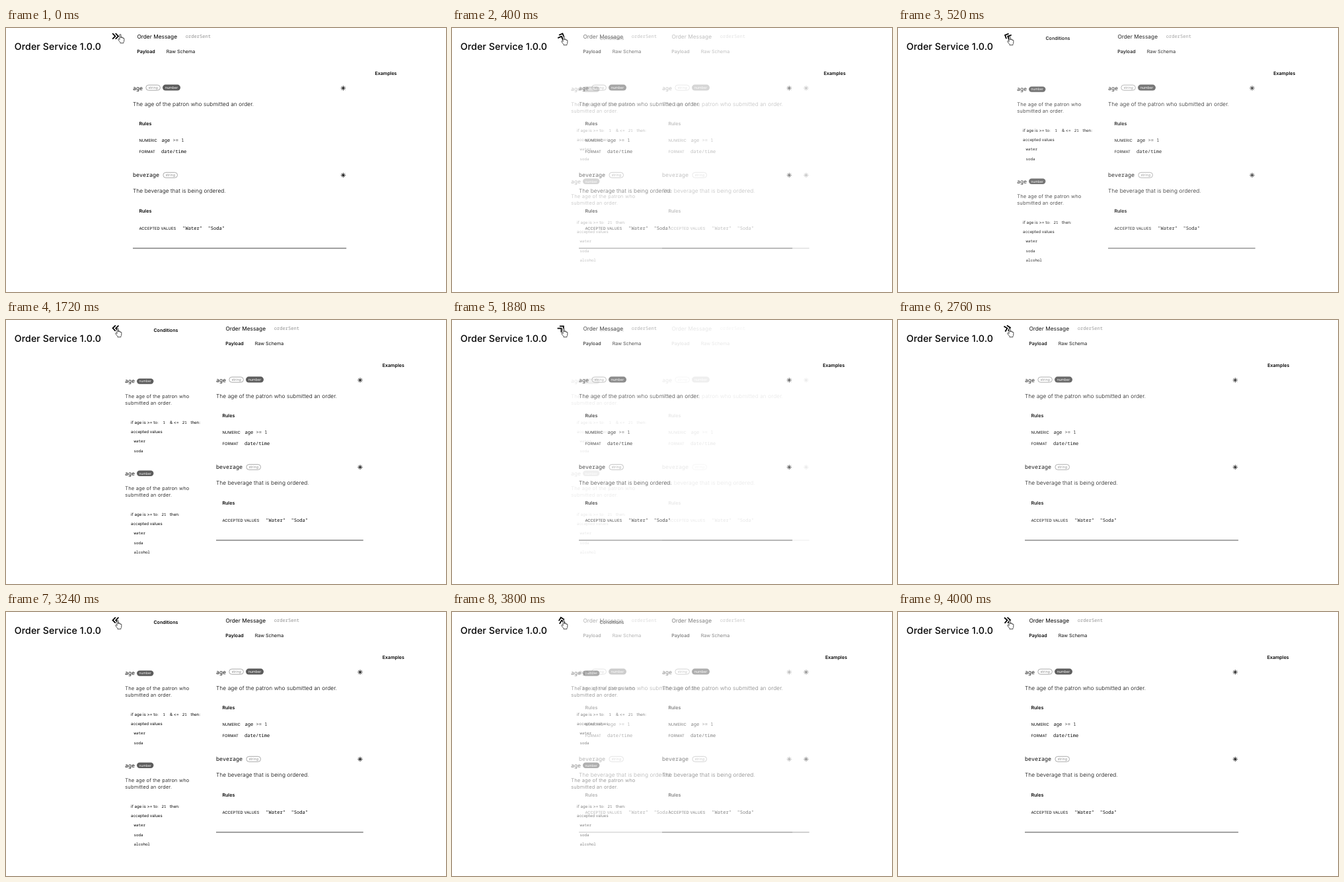
Write an HTML page that moves like this. It is 666 by 399 pixels and loops after 4.08 s.

```html
<!DOCTYPE html>
<html lang="en">
<head>
<meta charset="utf-8">
<title>Order Service</title>
<style>
  @property --p { syntax: "<number>"; inherits: true; initial-value: 0; }

  html, body { margin: 0; width: 100%; height: 100%; overflow: hidden; background: #fff; }
  svg {
    display: block; width: 666px; height: 399px;
    font: 400 7.08px Inter, sans-serif;
    text-rendering: geometricPrecision;
    animation: toggle 4080ms infinite;
  }

  /* --p: 0 = panel closed, 1 = panel open */
  @keyframes toggle {
    0%, 50.91%, 99.7%, 100% { --p: 0; }
    7.75%, 42.08%, 66.91%, 90.9% { animation-timing-function: cubic-bezier(0, 0, .58, 1); }
    7.75%, 66.91% { --p: 0; }
    16.57%, 42.08%, 75.74%, 90.9% { --p: 1; }
  }
  @keyframes point {
    0% { transform: translate(169px, 9px); }
    .98%, 100% { transform: translate(165px, 12px); }
  }

  /* the faintest part of each fade stays invisible */
  .closed { opacity: calc(1 - 1.2 * var(--p)); }
  .open { opacity: calc(1.2 * var(--p) - .2); }
  .examples { transform: translateX(calc(var(--p) * 11.4px)); }
  .arrows { transform: translate(165.8px, 12.4px) rotate(calc(var(--p) * -180deg)); }
  .hand { animation: point 4080ms step-end infinite; }

  .title { font-size: 14.17px; font-weight: 500; letter-spacing: .11px; }
  .name { font-size: 8.33px; }
  .bold { font-weight: 600; }
  .desc { font-size: 8.33px; font-weight: 300; letter-spacing: .075px; }
  .caps { font-size: 5.83px; letter-spacing: .05px; }
  .mono { font-family: "Noto Sans Mono", "DejaVu Sans Mono", monospace; }
  .med { font-weight: 500; }
  .grey { fill: #909090; }
  .dark { fill: #333; }
  .tag { font-size: 5.42px; }
  .side { font-size: 7.5px; font-weight: 300; letter-spacing: .19px; }
  .small { font-size: 6.15px; }
  .value { font-size: 5.83px; font-weight: 500; }
  .line { stroke: #444; stroke-width: 1; }
  .outline { fill: #fff; stroke: #959595; stroke-width: .8; }
  .solid { fill: #5c5c5c; }
  .white { fill: #fff; }
</style>
</head>
<body>
<svg viewBox="0 0 666 399">
  <defs>
    <g id="head">
      <text class="name" x="198.4" y="15.8">Order Message</text>
      <text class="mono grey" x="271.8" y="15.2">orderSent</text>
      <text class="bold" x="198.3" y="38.1">Payload</text>
      <text x="242.8" y="38.1">Raw Schema</text>
    </g>

    <g id="string">
      <rect class="outline" x=".4" y=".4" width="21.6" height="8" rx="4"/>
      <text class="tag grey" x="4" y="6.2">string</text>
    </g>

    <g id="fields">
      <text class="mono name" x="192" y="93.5">age</text>
      <use href="#string" x="211.4" y="85.8"/>
      <rect class="solid" x="237" y="85.6" width="27" height="9" rx="4.5"/>
      <text class="tag white" x="240.7" y="92">number</text>
      <text class="desc" x="192" y="117.6">The age of the patron who submitted an order.</text>
      <text class="bold" x="201.4" y="146.5">Rules</text>
      <text class="caps" x="201.4" y="172.2">NUMERIC</text>
      <text class="mono" x="235.5" y="172.4"><tspan class="med">age</tspan> <tspan class="dark">&gt;= 1</tspan></text>
      <text class="caps" x="201.4" y="189">FORMAT</text>
      <text class="mono med" x="235" y="189.1">date/time</text>

      <text class="mono name" x="192" y="225.3">beverage</text>
      <use href="#string" x="237.5" y="217.9"/>
      <text class="desc" x="192" y="249.4">The beverage that is being ordered.</text>
      <text class="bold" x="201.4" y="278.5">Rules</text>
      <text class="caps" x="201.4" y="304.7">ACCEPTED VALUES</text>
      <text class="mono" x="267.2" y="304.8">"Water"</text>
      <text class="mono" x="305.6" y="304.8">"Soda"</text>
    </g>

    <path id="star" d="M-3.6 0H3.6M0-3.6V3.6M-2.6-2.6 2.6 2.6M-2.6 2.6 2.6-2.6" stroke="#000" stroke-width=".85"/>
    <g id="stars">
      <use href="#star" x="510.4" y="90.9"/>
      <use href="#star" x="510.4" y="222.4"/>
    </g>

    <g id="rule">
      <text class="mono name" x="180" y="95.4">age</text>
      <rect class="solid" x="198" y="88.4" width="25.4" height="8.4" rx="4.2"/>
      <text class="white" style="font-size:5px" x="201.6" y="94.4">number</text>
      <text class="side" x="180.3" y="118">The age of the patron who</text>
      <text class="side" x="180.3" y="127.6">submitted an order.</text>
      <text class="small" x="189" y="156.6">if age is &gt;= to:</text>
      <text class="small" x="189" y="171">accepted values</text>
      <text class="mono value" x="193.4" y="185.3">water</text>
      <text class="mono value" x="193.4" y="199.5">soda</text>
    </g>
  </defs>

  <text class="title" x="12.8" y="33">Order Service 1.0.0</text>
  <text class="bold examples" x="558.4" y="70.7">Examples</text>

  <g class="closed">
    <use href="#head"/>
    <use href="#fields"/>
    <use href="#stars"/>
    <path class="line" d="M192 332.9H515.2"/>
  </g>

  <g class="open">
    <text class="bold" x="223.4" y="17.5">Conditions</text>
    <use href="#rule"/>
    <text class="mono value" x="237.6" y="156.6">1</text>
    <text class="small" x="248" y="156.6">&amp; &lt;=</text>
    <text class="mono value" x="266.8" y="156.6">21</text>
    <text class="small" x="279.4" y="156.6">then:</text>
    <use href="#rule" y="139.2"/>
    <text class="mono value" x="235.4" y="295.8">21</text>
    <text class="small" x="248" y="295.8">then:</text>
    <text class="mono value" x="193.4" y="353.2">alcohol</text>

    <use href="#head" x="134"/>
    <use href="#fields" x="126"/>
    <use href="#stars" x="25.6"/>
    <path class="line" d="M318 332.9H540.8"/>
  </g>

  <path class="arrows" d="M-4.6-4.2-.4 0-4.6 4.2M0-4.2 4.2 0 0 4.2" fill="none" stroke="#000" stroke-width="1.75"/>
  <path class="hand" fill="#fff" stroke="#222" stroke-width=".8" stroke-linejoin="round"
    d="M3 8.5V1.5a1 1 0 0 1 2 0V6 5.4a.9.9 0 0 1 1.8 0V6.2a.8.8 0 0 1 1.6 0V7a.7.7 0 0 1 1.4 0V10q0 1.6-.9 2.6V13.8H3.9V12.6Q2.2 11 .9 8.6C.5 7.5 1.6 6.9 2.3 7.7Z"/>
</svg>
</body>
</html>
```
